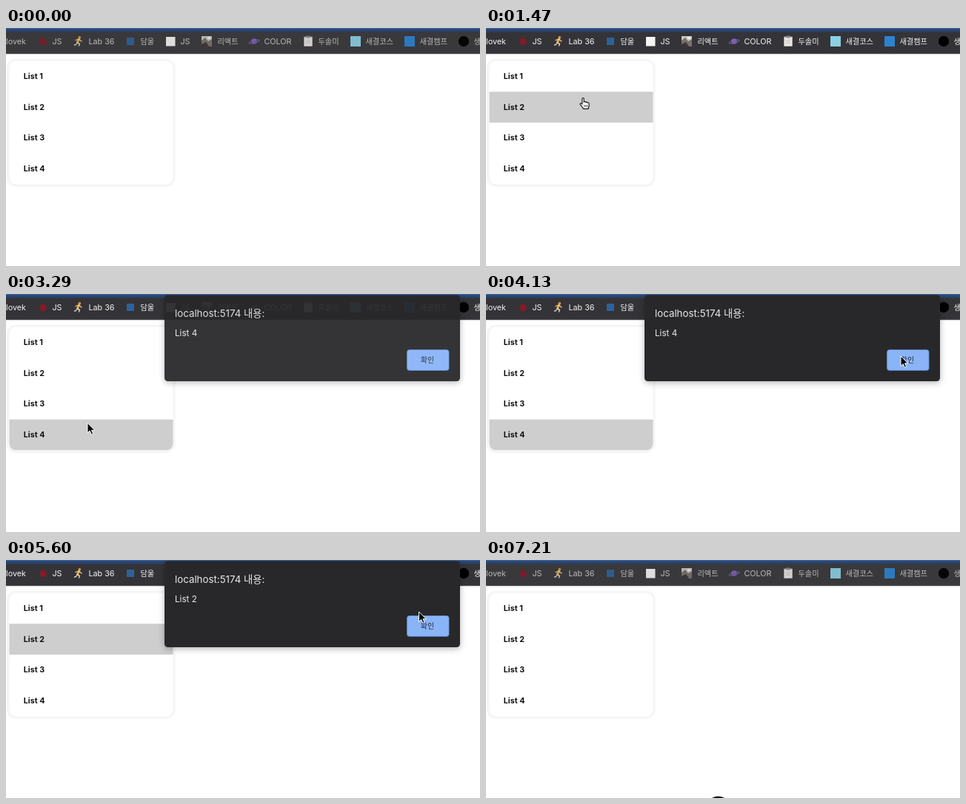
These frames come from a looping animation (640x322 px, 7.28 s). An HTML page:

```html
<!DOCTYPE html>
<html lang="ko">
<head>
<meta charset="utf-8">
<title>List hover and alert</title>
<style>
  html, body { margin: 0; width: 100%; height: 100%; overflow: hidden; background: #fff; }
  svg { display: block; }
  text { font-family: Inter, "Noto Sans CJK KR", "Noto Sans CJK", sans-serif; }
  #bar { fill: #343337; }
  #marks text { font-size: 10.8px; fill: #f4f4f5; }
  #marks .ko { font-size: 10.2px; }
  .idle #bar { fill: #39383b; }
  .idle #marks text { fill: #b9b9bb; }
  .idle #icons { opacity: .88; }
  #rows rect { fill: #cecece; visibility: hidden; }
  #rows rect.on { visibility: visible; }
  #labels text { font-size: 10.7px; font-weight: 700; fill: #111; }
  #card { filter: drop-shadow(0 0 1px rgba(0,0,0,.1)); }
  #panel { filter: drop-shadow(0 2px 4px rgba(0,0,0,.3)); }
  #alert { transform-origin: 413.5px 60px; }
  #alert text { fill: #e8eaed; }
  #alert .ok { font-size: 10px; font-weight: 500; fill: #202d45; }
</style>
</head>
<body>
<svg id="stage" width="640" height="322" viewBox="0 0 640 322">
  <defs>
    <clipPath id="round"><rect x="4.500" y="44.500" width="221" height="167" rx="9"/></clipPath>
    <linearGradient id="edge" x2="0" y2="1">
      <stop offset="0" stop-color="#4673b0"/>
      <stop offset=".25" stop-color="#2b4a7a"/>
      <stop offset=".8" stop-color="#2b3f62"/>
      <stop offset="1" stop-color="#343741"/>
    </linearGradient>
  </defs>
  <rect width="640" height="322" fill="#fff"/>
  <rect id="bar" width="640" height="35"/>
  <rect width="640" height="6" fill="url(#edge)"/>
  <rect y="34" width="640" height="1.200" fill="#4b4a4d"/>

  <g id="icons">
    <circle cx="50" cy="18.500" r="5" fill="#7d1d29"/>
    <g fill="none" stroke-linecap="round" stroke-linejoin="round">
      <path d="M98.500 15L96.500 19.500" stroke="#e8b23c" stroke-width="3"/>
      <path d="M98 15L94 16.500M99 15.500L102 18" stroke="#f3c893" stroke-width="1.300"/>
      <path d="M96.500 20L99.500 21.500 98.500 24M96 20L94.500 22.500 92.500 23" stroke="#d9d2c4" stroke-width="1.400"/>
      <circle cx="99.300" cy="12.800" r="1.100" stroke="#e0ad62" stroke-width="1.300"/>
    </g>
    <rect x="163" y="13" width="10" height="10" fill="#2c6299"/>
    <rect x="216" y="12" width="12.500" height="12.500" fill="#f4f4f4"/>
    <g>
      <rect x="264" y="11" width="14" height="14" fill="#c9c7c1"/>
      <path d="M264 17L269 13 273 18 278 15V25H264Z" fill="#77716b"/>
      <path d="M264 25V22L270 19 274 25Z" fill="#39373a"/>
      <rect x="272" y="12" width="4" height="3" fill="#eeece5"/>
    </g>
    <g transform="rotate(-14 335 18)">
      <circle cx="335" cy="18" r="3.800" fill="#7c57ba"/>
      <path d="M332 16.500H338" stroke="#a079d4"/>
      <ellipse cx="335" cy="18.500" rx="7" ry="1.700" fill="none" stroke="#7468a5" stroke-width="1.100"/>
    </g>
    <g>
      <rect x="402" y="11.500" width="12" height="13.500" rx="1" fill="#b0a69d"/>
      <rect x="403" y="12.800" width="10" height="11.400" fill="#e7e7e8"/>
      <rect x="405.500" y="10.500" width="5" height="3" rx="1" fill="#8a8a8d"/>
      <path d="M405 16.500H411M405 18.500H411M405 20.500H411" stroke="#bfc0c3" stroke-width=".7"/>
    </g>
    <rect x="465" y="11" width="14" height="14" fill="#8bd0e4"/>
    <rect x="538" y="11" width="14" height="14" fill="#2c83d2"/>
    <circle cx="618" cy="18" r="7.200" fill="#000"/>
  </g>
  <g id="marks"></g>

  <g id="card">
    <rect x="2" y="42.700" width="225.500" height="171" rx="11.500" fill="#f5f5f5"/>
    <rect x="4.500" y="44.500" width="221" height="167" rx="9" fill="#fff"/>
  </g>
  <g id="rows" clip-path="url(#round)"></g>
  <g id="labels"></g>

  <g id="alert">
    <g id="panel">
      <rect x="214" y="1.500" width="399" height="116.500" rx="4.500" fill="#28282a"/>
    </g>
    <text x="228" y="31" font-size="13.300">localhost:5174 내용:</text>
    <text id="message" x="228" y="56.500" font-size="11.700"></text>
    <rect x="541" y="75" width="57.500" height="29" rx="4" fill="#5277b4"/>
    <rect x="541.800" y="75.800" width="56" height="27.300" rx="3.500" fill="#8ab4f8"/>
    <text class="ok" x="569" y="93" text-anchor="middle">확인</text>
  </g>

  <circle id="dot" cx="313.500" cy="336.800" r="17" fill="#111"/>
  <g id="cursor" stroke-linejoin="round">
    <path id="arrow" d="M0 0V13.500L3.200 10.600 5.300 15.400 7.600 14.400 5.500 9.800H9.800Z" fill="#000" stroke="#fff"/>
    <g id="hand" transform="translate(-4.700 -.5)">
      <path d="M3.600 1.600C3.600 .2 5.900 .2 5.900 1.600V6.200C6.300 5.200 8.200 5.400 8.200 6.600 8.700 5.800 10.500 6 10.500 7.200 11 6.500 12.800 6.800 12.800 8.200V11C12.800 12.600 12 13.200 11.800 15.400H5.200C5 13.600 2.600 11.800 .9 9.400 .2 8.200 1.600 7.200 2.600 8.100L3.600 9.200Z" fill="#fff" stroke="#111" stroke-width="1.100"/>
      <path d="M6.500 10V13M8.500 10V13M10.500 10V13" stroke="#222" stroke-width=".8"/>
    </g>
  </g>
</svg>
<script>
const LOOP = 7280, STEP = 70, CLOSING = 210, ROW_TOP = 44.5, ROW_H = 41.75;
const $ = id => document.getElementById(id);

function add(parent, tag, attrs, content = '') {
  const el = document.createElementNS('http://www.w3.org/2000/svg', tag);
  for (const key in attrs) el.setAttribute(key, attrs[key]);
  el.textContent = content;
  return $(parent).appendChild(el);
}

add('marks', 'text', { x: 27, y: 21.5, 'text-anchor': 'end' }, 'Tulovek');
[[63, 'JS'], [112, 'Lab 36'], [182, '담울'], [236, 'JS'], [286, '리액트'], [349, 'COLOR'],
 [422, '두솔미'], [486, '새결코스'], [559, '새결캠프'], [632, '생']]
  .forEach(([x, label]) => add('marks', 'text',
    { x: x - .6, y: 21.5, class: /[가-힣]/.test(label) ? 'ko' : 'en' }, label));

const rows = [0, 1, 2, 3].map(i => {
  const y = ROW_TOP + i * ROW_H;
  add('labels', 'text', { x: 23.8, y: y + 24.4 }, `List ${i + 1}`);
  return add('rows', 'rect', { x: 4, y, width: 222, height: ROW_H });
});

// Pointer path: time, x, y
const path = [
  [70, 313, 324], [630, 142, 68], [980, 138, 70], [1470, 131, 94.5], [2310, 114, 150],
  [2660, 112, 187], [2800, 112, 187], [2870, 111, 175.5], [3150, 111, 175.5],
  [3220, 110, 174.5], [3290, 110, 174.5], [3570, 430, 100], [3710, 560, 84],
  [4130, 560, 84], [4410, 168, 115], [4620, 160, 108], [4900, 152, 104], [5250, 152, 104],
  [5600, 557.5, 70], [5740, 565, 84], [6160, 565, 84], [6650, 420, 222], [7000, 313, 324]
];

// An open dialog keeps its row lit until it has closed
const alerts = [{ row: 3, open: 3220, close: 4200 }, { row: 1, open: 5250, close: 6160 }];

function pointAt(t) {
  const i = path.findIndex(p => p[0] > t);
  if (i < 1) return path[i < 0 ? path.length - 1 : 0].slice(1);
  const [t0, x0, y0] = path[i - 1], [t1, x1, y1] = path[i];
  const k = (t - t0) / (t1 - t0);
  return [x0 + (x1 - x0) * k, y0 + (y1 - y0) * k];
}

function rowAt(x, y) {
  const i = Math.floor((y - ROW_TOP) / ROW_H);
  return x > 4 && x < 226 && i >= 0 && i < 4 ? i : -1;
}

function drawAlert(a, t) {
  $('alert').style.display = a ? '' : 'none';
  if (!a) return;
  const shut = Math.max(0, (t - a.close) / CLOSING);
  const shown = [.6, .94][(t - a.open) / STEP] ?? 1;
  $('alert').style.opacity = shown * (1 - shut);
  $('alert').style.transform = `scale(${1 - .067 * shut})`;
  $('message').textContent = `List ${a.row + 1}`;
}

function draw(t) {
  const [x, y] = pointAt(t);
  const held = alerts.find(a => t >= a.open && t < a.close + CLOSING);
  const lit = held ? held.row : rowAt(x, y);
  const hand = !held && lit >= 0;

  $('stage').classList.toggle('idle', t < 140 || t >= 7070);
  rows.forEach((row, i) => row.classList.toggle('on', i === lit));
  drawAlert(held, t);

  $('cursor').setAttribute('transform', `translate(${x} ${y})`);
  $('hand').style.display = hand ? '' : 'none';
  $('arrow').style.display = hand ? 'none' : '';
  $('dot').style.display = t >= 7140 ? '' : 'none';
}

const start = performance.now();
function tick() {
  const t = (performance.now() - start) % LOOP;
  draw(Math.floor(t / STEP) * STEP);
  requestAnimationFrame(tick);
}
tick();
</script>
</body>
</html>
```
